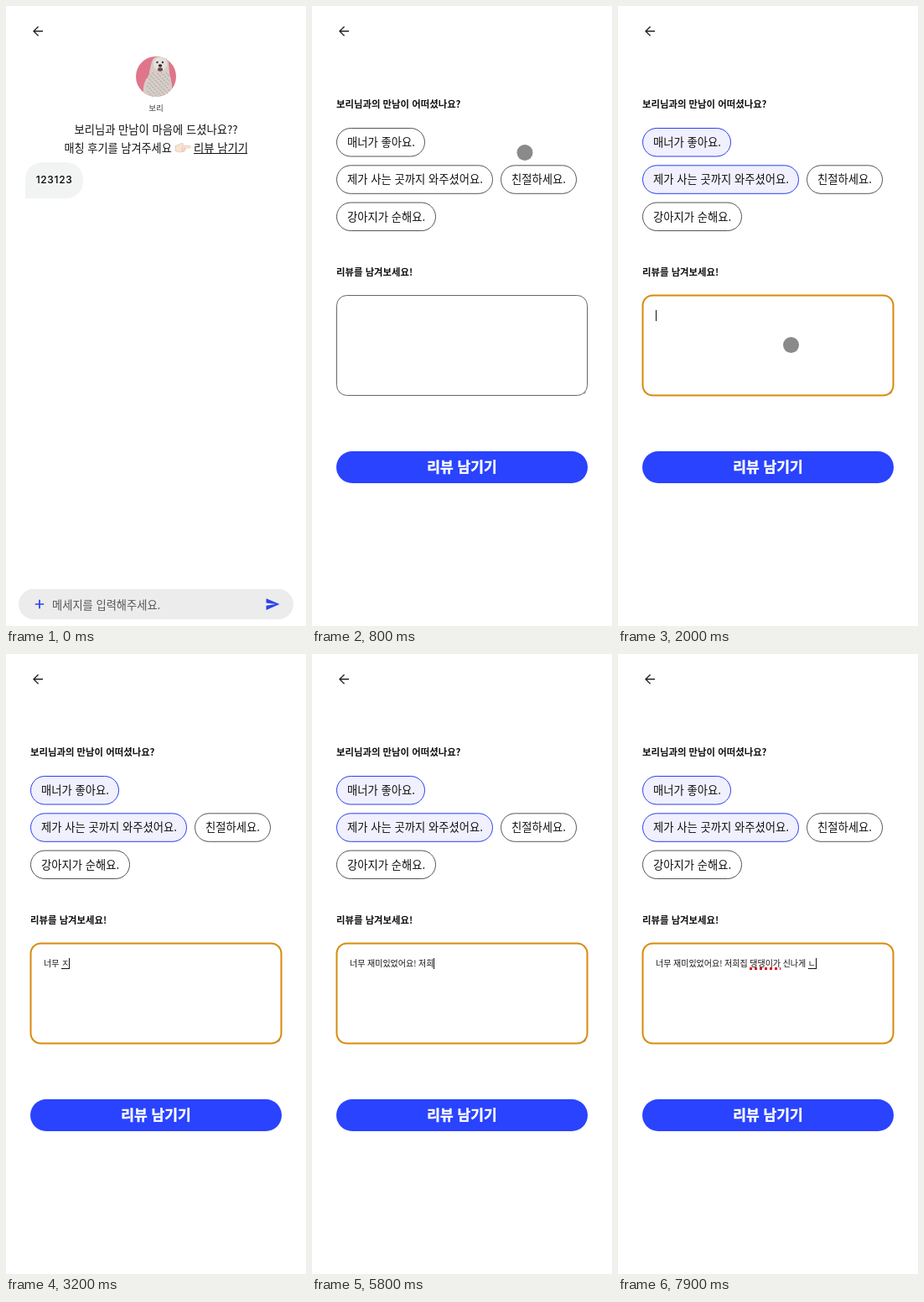
Animation of 358x738 px, one loop 8 s. Source, as an HTML page:

```html
<!DOCTYPE html>
<html lang="ko">
<head>
<meta charset="utf-8">
<title>후기 남기기</title>
<style>
  html, body { margin: 0; width: 100%; height: 100%; overflow: hidden; background: #fff; }
  #stage { position: absolute; left: 0; top: 0; width: 358px; height: 738px; overflow: hidden; background: #fff; }
  svg { position: absolute; left: 0; top: 0; }
  #stage, text { font-family: "Noto Sans CJK KR", "Noto Sans KR", "Noto Sans CJK", sans-serif; }
  text { font-size: 13.33px; fill: #111; white-space: pre; }
  .bold { font-size: 11.4px; font-weight: 700; }
  .digits { font: 500 12px Inter, sans-serif; letter-spacing: .65px; fill: #000; }
  .button { font-size: 17.1px; font-weight: 700; fill: #fff; stroke: #fff; stroke-width: .4px; }
  .chip rect { fill: #fff; stroke: #555; height: 33.5px; rx: 16.75px; }
  .chip.on rect { fill: #f0f0fe; stroke: #2a3ff0; }
  #box { fill: #fff; stroke: #666; }
  #box.focus { stroke: #d98a0c; stroke-width: 2; }
  #entry { position: absolute; left: 45px; top: 360.5px; height: 14px; line-height: 14px; font-size: 10px; word-spacing: -.2px; white-space: pre; color: #111; }
  #word { text-decoration: underline dotted #d8101c 2.5px; text-underline-offset: .5px; text-decoration-skip-ink: none; }
  #comp { text-decoration: underline #111 1px; text-underline-offset: 1.5px; text-decoration-skip-ink: none; }
  #caret { display: inline-block; width: 1px; height: 13px; margin: 1px -1px 0 0; vertical-align: top; background: #111; }
</style>
</head>
<body>
<div id="stage">
  <svg width="358" height="738" viewBox="0 0 358 738">
    <path transform="translate(29 21) scale(.75)" fill="#222" d="M20 11.1H7.6l5.8-5.7L12.1 4 4 12l8.1 8 1.3-1.4-5.8-5.7H20z"/>

    <g id="chat">
      <clipPath id="round"><circle cx="179" cy="84" r="24"/></clipPath>
      <g clip-path="url(#round)">
        <rect x="155" y="60" width="48" height="48" fill="#e0758a"/>
        <path d="M174 66 q2-6 9-6 q9 0 11 7 l1 13 q4 12 3 30 h-34 q-2-18 6-27z" fill="#d6cdc8"/>
        <path id="fur" fill="none" stroke="#8d7f7c" stroke-width=".9" stroke-opacity=".75"/>
        <ellipse cx="184" cy="69" rx="8" ry="8" fill="#e6e0dc"/>
        <circle cx="180.500" cy="67" r="1.200" fill="#3a3333"/>
        <circle cx="187" cy="67" r="1.200" fill="#3a3333"/>
        <ellipse cx="184" cy="71" rx="2.200" ry="1.700" fill="#2c2626"/>
        <ellipse cx="184" cy="75.500" rx="3" ry="2.200" fill="#6b484a"/>
      </g>
      <text x="179" y="124.600" text-anchor="middle" style="font-size:9.6px;fill:#444">보리</text>
      <text x="179" y="152" text-anchor="middle" style="font-size:13.3px">보리님과 만남이 마음에 드셨나요??</text>
      <text x="69.500" y="174" style="font-size:13.15px">매칭 후기를 남겨주세요</text>
      <g fill="#f9e3d5" stroke="#e0b8a4" stroke-width=".6" stroke-linejoin="round">
        <path d="M202 166.500 l4-1.500 q3-2 5-1.500 q1.500 .8 0 2 l-1 .8 h8.500 q1.800 .2 1.800 1.400 t-1.800 1.400 h-5.500 q1.500 .5 1 1.700 q.3 1.200-1 1.500 q-.5 1.500-2.500 1.500 h-4.500 l-4-1.300z"/>
        <path d="M213 169 h-4 M214 170.800 h-5 M213 172.400 h-4" fill="none"/>
      </g>
      <text x="224" y="174">리뷰 남기기</text>
      <path d="M224 175.500h64" stroke="#111"/>
      <path d="M23 229V206a20 20 0 0 1 20-20h29a20 20 0 0 1 20 20v3a20 20 0 0 1-20 20z" fill="#f2f4f4"/>
      <text class="digits" x="35.700" y="211.300">123123</text>
      <rect x="15" y="694" width="328" height="36" rx="18" fill="#ececec"/>
      <path d="M34.800 712h10.400M40 706.800v10.400" stroke="#2b43ee" stroke-width="1.700"/>
      <text x="55" y="718" style="font-size:13.25px;fill:#555">메세지를 입력해주세요.</text>
      <path transform="translate(309 703) scale(.76)" fill="#2b43ee" d="M2 21 23 12 2 3v7l15 2-15 2z"/>
    </g>

    <g id="review">
      <text class="bold" x="29" y="120.800">보리님과의 만남이 어떠셨나요?</text>
      <g id="chips"></g>
      <text class="bold" x="29" y="320.800">리뷰를 남겨보세요!</text>
      <rect id="box"/>
      <path d="M324.500 461.500l2-2M326 461.500l.8-.8" stroke="#777" stroke-width=".8"/>
      <rect x="29" y="530" width="300" height="38" rx="19" fill="#2943ff"/>
      <text class="button" x="179" y="555" text-anchor="middle">리뷰 남기기</text>
    </g>
  </svg>
  <div id="entry"><span id="done"></span><span id="word"></span><span id="tail"></span><span id="comp"></span><span id="caret"></span></div>
  <svg width="358" height="738"><circle id="touch" r="9.500" fill="#3c3c3c" fill-opacity=".6"/></svg>
</div>
<script>
const LOOP = 8000, STEP = 100;
const OPEN = 800, FOCUS = 1900, TYPE = 2500;
const $ = id => document.getElementById(id);
const show = (el, on) => { el.style.visibility = on ? 'visible' : 'hidden'; };

// x, y, width, label, time of selection
const chips = [
  [29, 145, 106, '매너가 좋아요.', 1200],
  [29, 189.3, 187, '제가 사는 곳까지 와주셨어요.', 1700],
  [225, 189.3, 91, '친절하세요.', Infinity],
  [29, 233.5, 119, '강아지가 순해요.', Infinity]
];
$('chips').innerHTML = chips.map(([x, y, w, label]) =>
  `<g class="chip"><rect x="${x + .5}" y="${y + .5}" width="${w - 1}"/><text x="${x + 13}" y="${y + 22}">${label}</text></g>`
).join('');

// Short tufts scattered evenly over the dog's coat
$('fur').setAttribute('d', Array.from({ length: 60 }, (_, i) => {
  const x = 168 + i * .618 % 1 * 27, y = 78 + i / 2;
  return `M${x} ${y}l1.2 1.5`;
}).join(''));

// time, x, y of the touch pointer
const path = [
  [100, 348, 330], [200, 325, 270], [400, 271, 193], [600, 251.5, 174.5], [800, 254, 174.5],
  [900, 268, 176], [1000, 228, 182], [1200, 113, 180.5], [1300, 109.5, 179.5],
  [1500, 132, 200], [1700, 146, 204], [1800, 158, 206], [1900, 196, 360], [2000, 206.5, 403.5]
];

// Each phrase is fixed text followed by the successive states of the syllable being composed.
const phrases = [
  ['', [2500, 'ㄴ'], [2600, '너'], [2700, '넘']],
  ['너', [2800, '무']],
  ['너무 ', [3000, ''], [3200, 'ㅈ'], [3300, '재'], [3400, '잼']],
  ['너무 재', [3500, '미'], [3600, '밍']],
  ['너무 재미', [3700, '이'], [3800, '있']],
  ['너무 재미있', [3900, '어'], [4100, '었']],
  ['너무 재미있었', [4200, '어'], [4300, '엉']],
  ['너무 재미있었어', [4400, '요']],
  ['너무 재미있었어요!', [4900, '']],
  ['너무 재미있었어요! ', [5000, ''], [5100, 'ㅈ'], [5200, '저'], [5300, '젛']],
  ['너무 재미있었어요! 저', [5400, '흐'], [5500, '희']],
  ['너무 재미있었어요! 저희', [5700, ''], [5900, '지'], [6000, '집']],
  ['너무 재미있었어요! 저희집 ', [6100, ''], [6500, '대'], [6600, '댕']],
  ['너무 재미있었어요! 저희집 댕', [6700, '대'], [6800, '댕']],
  ['너무 재미있었어요! 저희집 댕댕', [6900, '이']],
  ['너무 재미있었어요! 저희집 댕댕이', [7100, '가']],
  ['너무 재미있었어요! 저희집 댕댕이가 ', [7200, ''], [7300, '시'], [7400, '신']],
  ['너무 재미있었어요! 저희집 댕댕이가 신', [7500, '나'], [7600, '낙']],
  ['너무 재미있었어요! 저희집 댕댕이가 신나', [7700, '게']],
  ['너무 재미있었어요! 저희집 댕댕이가 신나게 ', [7800, ''], [7900, 'ㄴ']]
];
const states = phrases.flatMap(([done, ...comps]) => comps.map(([t, comp]) => ({ t, done, comp })));
const blinks = [[4600, 4900], [5700, 5800], [6300, 6500]];
const misspelt = '댕댕이가';

function pointAt(t) {
  const i = path.findIndex(p => p[0] > t);
  if (i < 0) return path[path.length - 1].slice(1);
  const [t0, x0, y0] = path[i - 1], [t1, x1, y1] = path[i];
  const k = (t - t0) / (t1 - t0);
  return [x0 + (x1 - x0) * k, y0 + (y1 - y0) * k];
}

function drawEntry(t) {
  const { done, comp } = states.filter(s => s.t <= t).pop() || { done: '', comp: '' };
  const [before, after] = done.split(misspelt + ' ');
  const marked = after !== undefined;
  $('done').textContent = before;
  $('word').textContent = marked ? misspelt : '';
  $('tail').textContent = marked ? ' ' + after : '';
  $('comp').textContent = comp;
  show($('entry'), t >= FOCUS);
  show($('caret'), t >= FOCUS && !blinks.some(([a, b]) => t >= a && t < b));
}

function drawBox(focus) {
  const attrs = { x: 29.5, y: 344.5, width: 299, height: 119, rx: 12 };
  for (const name in attrs) $('box').setAttribute(name, attrs[name]);
  $('box').classList.toggle('focus', focus);
}

function draw(t) {
  show($('chat'), t < OPEN);
  show($('review'), t >= OPEN);
  [...$('chips').children].forEach((el, i) => el.classList.toggle('on', t >= chips[i][4]));
  drawBox(t >= FOCUS);
  drawEntry(t);
  const visible = t >= path[0][0] && t < TYPE;
  show($('touch'), visible);
  if (visible) {
    const [x, y] = pointAt(t);
    $('touch').setAttribute('cx', x);
    $('touch').setAttribute('cy', y);
  }
}

function tick() {
  draw(Math.floor(performance.now() % LOOP / STEP) * STEP);
  requestAnimationFrame(tick);
}
tick();
</script>
</body>
</html>
```
